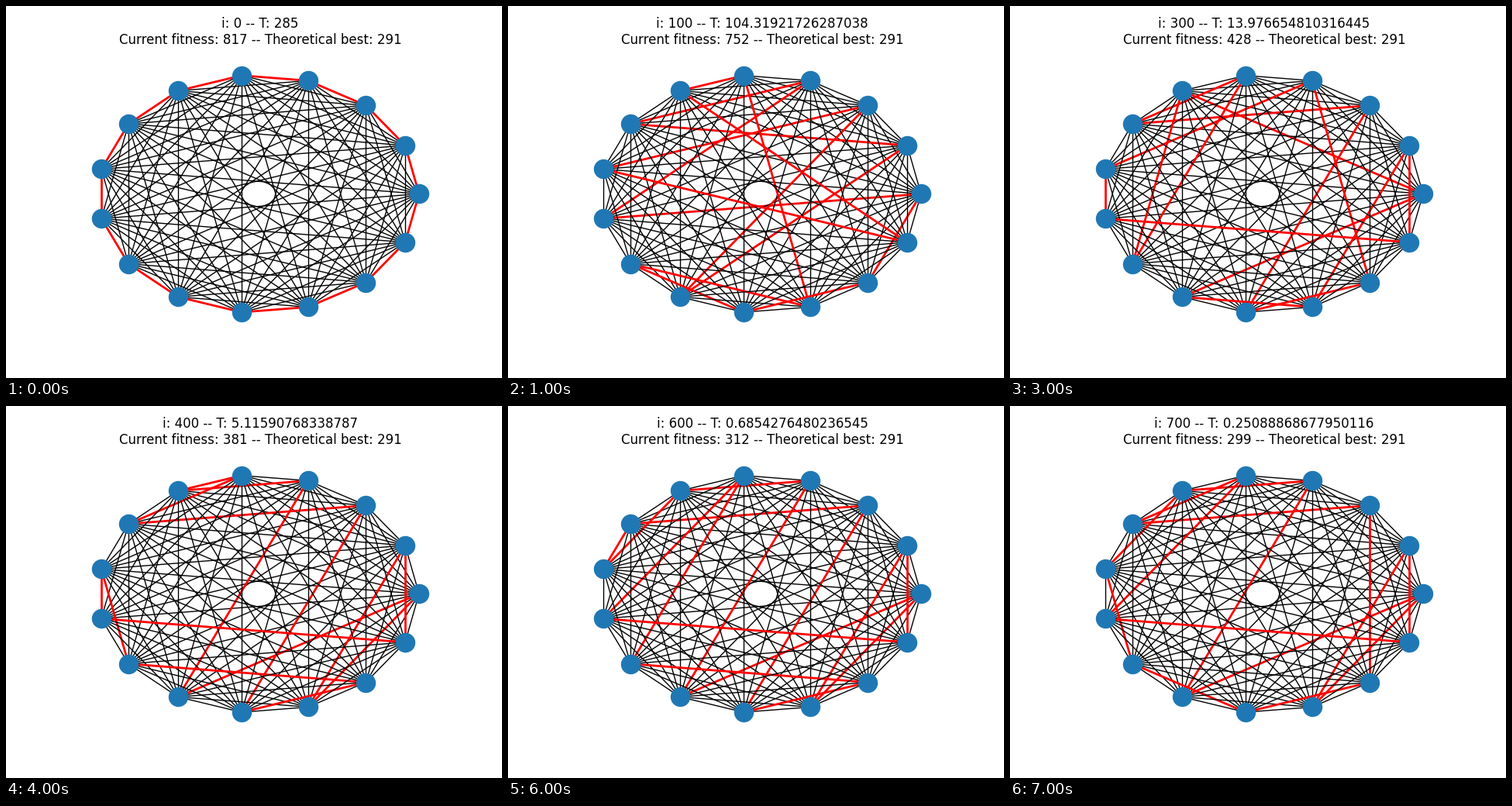
Animation, 640 px wide and 480 px high, one loop 8000 ms. Source, as a matplotlib script:

```python
import itertools

import matplotlib.pyplot as plt
import numpy as np
from matplotlib.animation import FuncAnimation
from matplotlib.collections import LineCollection

NODES = 15
START_TEMP = 285
COOLING = 0.99
STEPS = 100      # annealing iterations per picture
BEST = 291
FITNESS = [817, 752, 583, 428, 381, 344, 312, 299]

# Visiting orders while the search is still hot
HOT_TOURS = [
    list(range(NODES)),
    [0, 8, 3, 6, 1, 10, 2, 7, 14, 5, 4, 12, 9, 11, 13],
    [0, 6, 1, 12, 7, 13, 11, 10, 9, 2, 3, 5, 14, 4, 8],
    [0, 5, 9, 4, 6, 2, 11, 13, 3, 7, 8, 14, 1, 12, 10],
]

# City swaps accepted in each later round
SWAPS = [
    [(5, 9), (3, 9), (0, 10)],
    [(1, 12), (4, 7), (4, 8)],
    [(1, 12), (4, 8)],
    [(6, 9), (2, 13), (11, 13)],
]


def swap_cities(tour, pairs):
    tour = list(tour)
    for a, b in pairs:
        i, j = tour.index(a), tour.index(b)
        tour[i], tour[j] = b, a
    return tour


def temperature(i):
    temp = START_TEMP
    for _ in range(i):
        temp *= COOLING
    return temp


cooled = itertools.accumulate(SWAPS, swap_cities, initial=HOT_TOURS[-1])
tours = HOT_TOURS[:-1] + list(cooled)

angles = 2 * np.pi * np.arange(NODES) / NODES
pos = np.column_stack([np.cos(angles), np.sin(angles)])
edges = list(itertools.combinations(range(NODES), 2))

fig, ax = plt.subplots(figsize=(6.4, 4.8), dpi=100)
ax.set_axis_off()
ax.margins(0.105)
ax.scatter(pos[:, 0], pos[:, 1], s=300, c="#1f78b4", zorder=2)
graph = LineCollection([pos[list(edge)] for edge in edges], zorder=1)
ax.add_collection(graph, autolim=False)
title = ax.set_title("")


def draw(frame):
    i = frame * STEPS
    tour = tours[frame]
    route = {tuple(sorted(leg)) for leg in zip(tour, tour[1:] + tour[:1])}
    graph.set_color(["red" if edge in route else "black" for edge in edges])
    graph.set_linewidth([2 if edge in route else 1 for edge in edges])
    title.set_text(f"i: {i} -- T: {temperature(i)}\n"
                   f"Current fitness: {FITNESS[frame]} -- "
                   f"Theoretical best: {BEST}")
    return graph, title


anim = FuncAnimation(fig, draw, frames=len(tours), interval=1000,
                     repeat=True, repeat_delay=0)
plt.show()
```
